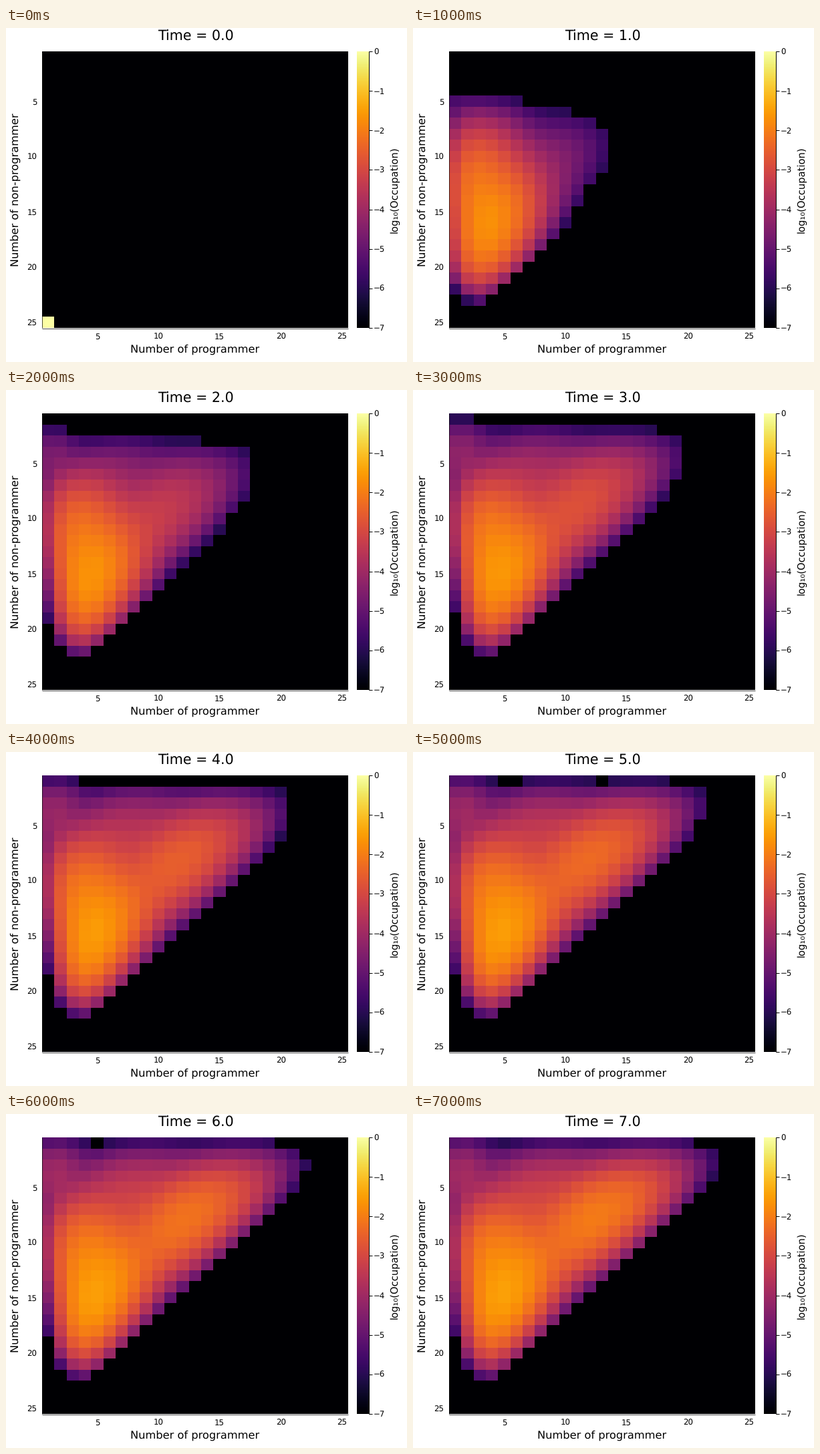
A matplotlib script for the animation above (8000 ms loop, 600x500 px).

```python
import numpy as np
import matplotlib.pyplot as plt
from matplotlib.animation import FuncAnimation

W, H, DPI, N = 600, 500, 100, 25
FLOOR, CUTOFF = -7, -6
LEFT, RIGHT, TOP, BOTTOM = 54, 512, 35, 449
END = 7
plt.rcParams["font.family"] = "DejaVu Sans"
plt.rcParams["text.hinting"] = "none"

# People in each of three states: programmers p, non-programmers n, others z
TOTAL = N - 1
n, p = np.mgrid[0:N, 0:N]
z = np.maximum(TOTAL - p - n, 0)
outside = p + n > TOTAL
log_fact = np.concatenate([[0], np.cumsum(np.log10(np.arange(1, N)))])
ways = log_fact[TOTAL] - log_fact[p] - log_fact[n] - log_fact[z]

# Rare states: hardly any programmers while non-programmers abound
rare = 0.45 ** p * (0.0108 * n**2 + 5 * (n / 21) ** 20)
# Distance to travel: many programmers, then few non-programmers
climb = 0.2 * p**1.2 * np.clip(1 - (n / 19) ** 2, 0, None)
top = 9.8 * np.exp(-(n + 1) / 2.2)


def mode(weight, a, b):
    """Multinomial with shares a, b and the rest, scaled by 10**weight."""
    logs = ways + p * np.log10(a) + n * np.log10(b) + z * np.log10(1 - a - b)
    return 10 ** (logs + weight)


def occupation(t):
    if t == 0:
        field = np.full((N, N), float(FLOOR))
        field[-1, 0] = 0
        return field
    lag = ((END / t - 1) / (END - 1)) ** 0.9
    settled = 1 - np.exp(-0.29 * t**2.8)
    field = np.log10(
        mode(0, 0.15, 0.58)
        + mode(-0.5, 0.11, 0.45)
        + mode(-0.56, 0.47, 0.28)
        + mode(-1.78 - 0.3 * lag, 0.28, 0.20)
        + mode(-2.7 - 0.6 * lag, 0.04, 0.13)
    )
    field -= settled * rare + lag * climb + (lag**1.7 + 0.086) * top
    field[outside | (field < CUTOFF)] = FLOOR
    return field


fig = plt.figure(figsize=(W / DPI, H / DPI), dpi=DPI, facecolor="white")
ax = fig.add_axes([0, 0, 1, 1])
ax.axis("off")


def text(x, y, s, px, ha="center", **kw):
    return ax.text(x, y, s, fontsize=px * 72 / DPI, ha=ha, va="baseline", **kw)


def side_text(x, y, s, px):
    text(x, y, s, px, rotation=90, rotation_mode="anchor")


def line(xs, ys, width=0.72):
    ax.plot(xs, ys, color="black", lw=width, solid_capstyle="butt")


style = dict(cmap="inferno", interpolation="nearest", aspect="auto")
heat = ax.imshow(occupation(0), vmin=FLOOR, vmax=0,
                 extent=(LEFT, RIGHT, BOTTOM, TOP), **style)
ax.imshow(np.linspace(1, 0, 256)[:, None],
          extent=(525, 543, BOTTOM, TOP), **style)

line([LEFT - 0.5] * 2, [TOP, BOTTOM], 0.5)
line([LEFT - 0.5, RIGHT], [BOTTOM + 0.5] * 2, 0.5)
line([543, 543], [TOP, BOTTOM])

dx, dy = (RIGHT - LEFT) / N, (BOTTOM - TOP) / N
for k in range(5, N + 1, 5):
    text(LEFT + (k - 0.5) * dx, 466, str(k), 11.8)
    text(46.5, TOP + (k - 0.5) * dy + 5, str(k), 11.8, ha="right")
for k in range(8):
    y = TOP + k * (BOTTOM - TOP) / 7
    line([543, 548], [y, y])
    text(550, y + 4.4, f"\u2212{k}" if k else "0", 11.8, ha="left")

title = text(284, 18.7, "", 20.6)
text(282.5, 486, "Number of programmer", 16.25)
side_text(19, 242.5, "Number of non-programmer", 16.25)
side_text(585.5, 242, "log\u2081\u2080(Occupation)", 14.8)
ax.set_xlim(0, W)
ax.set_ylim(H, 0)


def draw(t):
    heat.set_data(occupation(t))
    title.set_text(f"Time = {t:.1f}")
    return heat, title


anim = FuncAnimation(fig, draw, frames=END + 1, interval=1000,
                     init_func=lambda: draw(0), repeat=True, repeat_delay=0)
plt.show()
```
